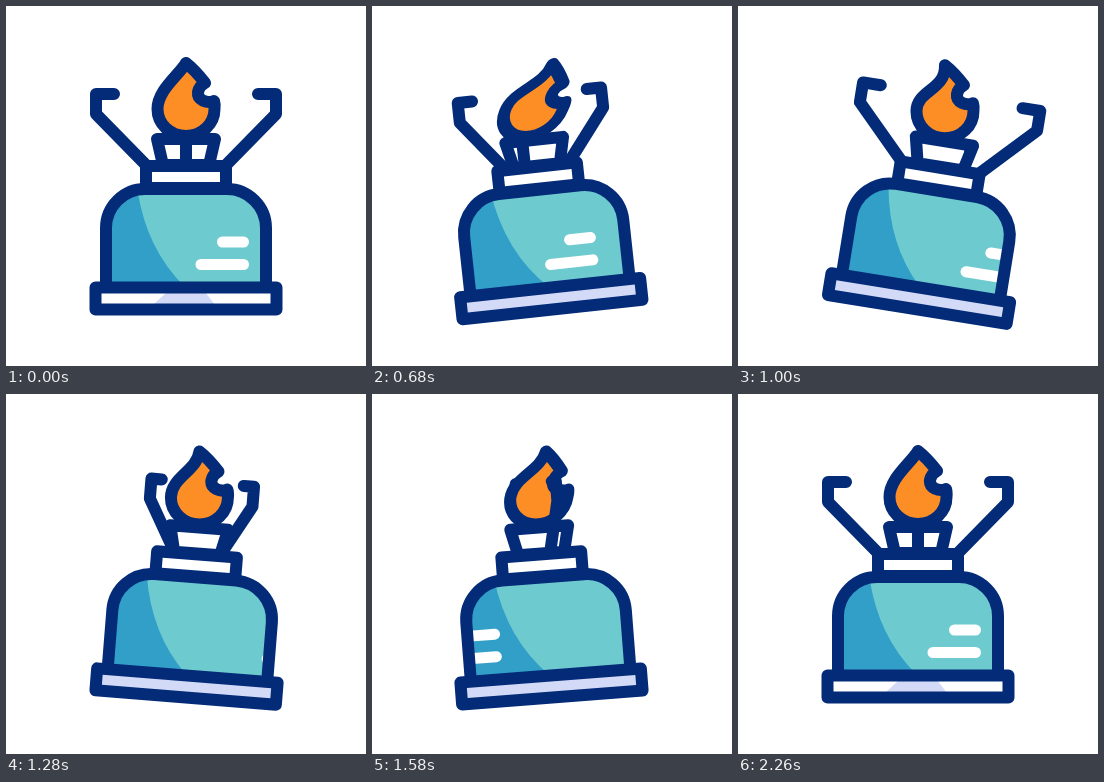
Recreate the animation shown at these times as an HTML page. Size 360x360 px, loop 2400 ms.

```html
<!DOCTYPE html>
<html lang="en">
<head>
<meta charset="utf-8">
<title>Camping stove</title>
<style>
  html, body { margin: 0; width: 100%; height: 100%; overflow: hidden; background: #fff; }
  svg { display: block; width: 100vw; height: 100vh; }
  .ink { stroke: #042b78; stroke-width: 12; stroke-linecap: round; stroke-linejoin: round; }
  .none { fill: none; }
  .white { fill: #fff; }
</style>
</head>
<body>
<svg viewBox="0 0 360 360">
  <defs>
    <clipPath id="tank"><path d="M100 281V222A39 39 0 0 1 139 183H221A39 39 0 0 1 260 222V281Z"/></clipPath>
    <clipPath id="cup"><path d="M151 133H209L203 159H157Z"/></clipPath>
    <clipPath id="foot"><path d="M90 282H270V303H90Z"/></clipPath>
  </defs>
  <g id="stove">
    <g id="back"></g>
    <path class="ink white" d="M151 133H209L203 159H157Z"/>
    <g clip-path="url(#cup)"><path id="post" class="ink" d="M180 133V160"/></g>
    <path id="flame" class="ink" fill="#fd8d25"/>
    <g id="front"></g>
    <path class="ink white" d="M140 160H220V182H140Z"/>
    <g clip-path="url(#tank)">
      <path fill="#6dcace" d="M95 180H265V285H95Z"/>
      <path fill="#319fc8" d="M95 180H131Q139 242 179 281H95Z"/>
      <path id="label" class="none" stroke="#fff" stroke-width="11" stroke-linecap="round" d="M216.500 236H237.500M195 258.500H237.500"/>
    </g>
    <path class="ink none" d="M100 281V222A39 39 0 0 1 139 183H221A39 39 0 0 1 260 222V281"/>
    <path class="white" d="M90 282H270V303H90Z"/>
    <g clip-path="url(#foot)"><path id="shade" fill="#d2daf8"/></g>
    <path class="ink none" d="M89.500 281.500H270.500V303.500H89.500Z"/>
  </g>
</svg>
<script>
const LOOP = 2400;
const LABEL_TURN = 290; // distance the label travels around the tank
const $ = id => document.getElementById(id);

// Smooth curve through [time, value] poses, flat at turning points and ends.
function track(...keys) {
  const last = keys.length - 1;
  const slope = i => (keys[i + 1][1] - keys[i][1]) / (keys[i + 1][0] - keys[i][0]);
  const tangents = keys.map((_, i) => {
    if (i === 0 || i === last) return 0;
    const a = slope(i - 1), b = slope(i);
    return a * b <= 0 ? 0 : 2 * a * b / (a + b);
  });
  return t => {
    if (t <= keys[0][0]) return keys[0][1];
    if (t >= keys[last][0]) return keys[last][1];
    const i = keys.findIndex(k => k[0] > t) - 1;
    const [t0, v0] = keys[i], [t1, v1] = keys[i + 1];
    const d = t1 - t0, u = (t - t0) / d, w = 1 - u;
    return v0 * (1 + 2 * u) * w * w + v1 * u * u * (3 - 2 * u)
      + d * u * w * (tangents[i] * w - tangents[i + 1] * u);
  };
}

const rock = track([200, 0], [670, -6.2], [1070, 10.5], [1560, -4.5], [1850, 0]);
const spin = track([200, 0], [660, -37], [1280, 55], [2260, 180]);
const slide = track([200, 0], [640, -13], [1000, 27], [1280, 63], [1860, 271], [2260, LABEL_TURN]);
const cover = track([200, 0], [480, 1], [1860, 1], [2260, 0]);

const arms = [-1, 1].map(side => {
  const path = document.createElementNS("http://www.w3.org/2000/svg", "path");
  path.setAttribute("class", "ink none");
  return { side, path };
});

function drawArm({ side, path }, angle) {
  const x = reach => 180 + side * reach * Math.cos(angle);
  path.setAttribute("d", `M${x(72)} 88L${x(90)} 88L${x(90)} 108L${x(41)} 158`);
  const layer = side * Math.sin(angle) < 0 ? $("front") : $("back");
  if (path.parentNode !== layer) layer.append(path);
}

// The flame stays upright on the rocking burner; its tip trails and curls.
function drawFlame(tilt) {
  const lean = (Math.max(0, -tilt) / 8.4) ** 3;
  const curl = Math.min(1, Math.abs(tilt) / 8);
  $("flame").setAttribute("transform", `translate(180 130) rotate(${-tilt}) translate(0 -27)
    matrix(1 0 ${-lean} 1 0 0) translate(-180 -103)`);
  $("flame").setAttribute("d", `M180 57C${173 + 8 * curl} ${69 + 13 * curl} 151.5 ${84 - 2 * curl} 151.5 103
    A28.5 27 0 0 0 208.5 103Q209 98 208 95C201 98 191 94 192 86Q193 80 199 77Q189 64 180 57Z`);
}

function render(t) {
  const tilt = rock(t);
  $("stove").setAttribute("transform", `rotate(${tilt} 180 299)`);
  drawFlame(tilt);

  const angle = spin(t) * Math.PI / 180;
  arms.forEach(arm => drawArm(arm, angle));

  const travel = slide(t);
  const shift = travel > LABEL_TURN / 2 ? travel - LABEL_TURN : travel;
  for (const id of ["label", "post"]) $(id).setAttribute("transform", `translate(${shift})`);

  const left = 147 - 75 * cover(t), right = 209 + 80 * cover(t);
  $("shade").setAttribute("d", `M${left} 299L${left + 14} 286H${right - 10}L${right} 299Z`);
}

const start = performance.now();
function tick() {
  render((performance.now() - start) % LOOP);
  requestAnimationFrame(tick);
}
tick();
</script>
</body>
</html>
```
